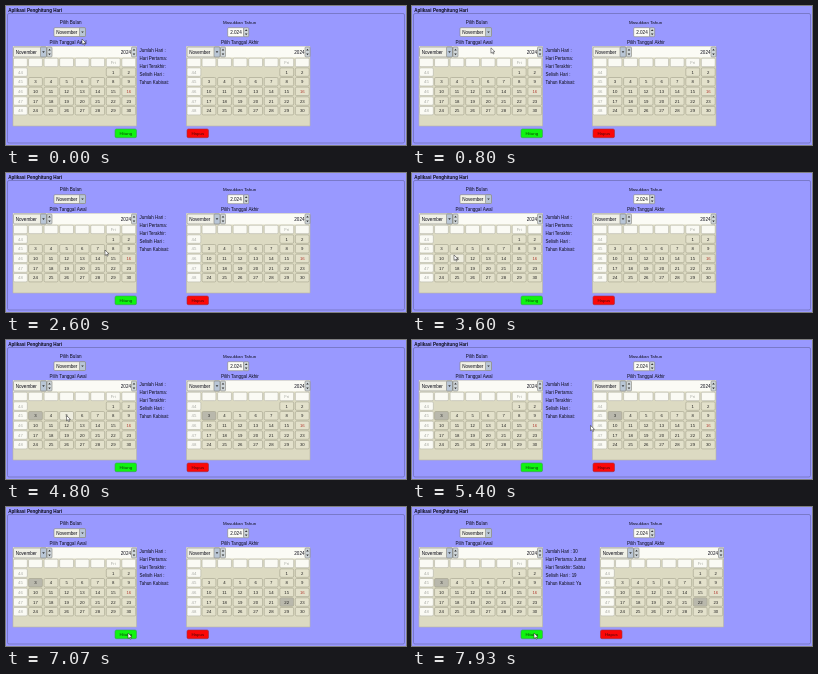
These frames come from a looping animation (400x139 px, 8 s). An HTML page with a canvas:

```html
<!DOCTYPE html>
<html lang="id">
<head>
<meta charset="utf-8">
<title>Aplikasi Penghitung Hari</title>
<style>
html, body { margin: 0; width: 100%; height: 100%; overflow: hidden; background: #9999ff; }
canvas { display: block; width: 400px; height: 139px; }
</style>
</head>
<body>
<canvas id="stage"></canvas>
<script>
const W = 400, H = 139, LOOP = 8000;
const START_CLICK = 4000, END_CLICK = 6100, COUNT_CLICK = 7400, PRESS = 120;
const FONT = '"Liberation Sans", Arial, sans-serif';
const canvas = document.getElementById('stage');
const ctx = canvas.getContext('2d');
const ratio = window.devicePixelRatio || 1;
canvas.width = Math.round(W * ratio);
canvas.height = Math.round(H * ratio);

// Pointer stops: time, x, y
const path = [
  [0, 76, 33], [870, 79, 42], [1600, 79.5, 47.5], [1800, 80, 49],
  [2600, 99, 77], [2800, 99, 78], [3600, 42, 82], [3900, 31, 75],
  [4350, 32, 75], [4800, 60.5, 75.5], [5950, 281.5, 94], [6330, 281.5, 94],
  [6930, 122, 126], [LOOP, 122, 126]
];

function pointerAt(t) {
  let i = 1;
  while (i < path.length - 1 && path[i][0] < t) i++;
  const [t0, x0, y0] = path[i - 1], [t1, x1, y1] = path[i];
  const k = (t - t0) / (t1 - t0), e = k * k * (3 - 2 * k);
  return { x: x0 + (x1 - x0) * e, y: y0 + (y1 - y0) * e };
}

function box(x, y, w, h, fill, stroke, r = 1) {
  ctx.beginPath();
  ctx.roundRect(x, y, w, h, r);
  if (fill) { ctx.fillStyle = fill; ctx.fill(); }
  if (stroke) { ctx.strokeStyle = stroke; ctx.lineWidth = 0.6; ctx.stroke(); }
}

function text(s, x, y, { size = 4.6, color = '#0c0c18', align = 'left', weight = '' } = {}) {
  ctx.font = `${weight} ${size}px ${FONT}`;
  ctx.fillStyle = color;
  ctx.textAlign = align;
  ctx.textBaseline = 'alphabetic';
  ctx.fillText(s, x, y + size * 0.36);
}

function arrow(x, y, dir) {
  ctx.fillStyle = '#333';
  ctx.beginPath();
  ctx.moveTo(x - 1.3, y - dir * 0.7);
  ctx.lineTo(x + 1.3, y - dir * 0.7);
  ctx.lineTo(x, y + dir);
  ctx.fill();
}

function combo(x, y, w, h, label) {
  box(x, y, w, h, '#f0f0e6', '#85857c');
  box(x + w - 6, y, 6, h, '#b9c6d6', '#85857c');
  text(label, x + 2.2, y + h / 2);
  arrow(x + w - 3, y + h / 2, 1);
}

function spinner(x, y, h) {
  box(x, y, 5, h, '#cfd6da', '#85857c');
  arrow(x + 2.5, y + h * 0.28, -1);
  arrow(x + 2.5, y + h * 0.72, 1);
}

function calendar(x, selected, mouse, pressed) {
  box(x, 40.5, 123.5, 79.5, '#dcdac2', '#b9b7a2', 0);
  box(x, 40.5, 123.5, 11, '#fbfbf5', null, 0);
  combo(x + 0.5, 41, 33, 10, 'November');
  spinner(x + 34, 41, 10);
  text('2024', x + 118, 46.3, { align: 'right' });
  spinner(x + 118.5, 41, 10);

  const cw = 15.55, rh = 9.65, top = 52.2;
  for (let row = 0; row < 6; row++) {
    for (let col = 0; col < 8; col++) {
      const cx = x + 0.5 + col * cw - (col ? 0.5 : 0), cy = top + row * rh;
      const w = cw - 1.7, h = rh - 1.2;
      const day = (row - 1) * 7 + col - 5;
      const plain = row === 0 || col === 0;
      if (!plain && (day < 1 || day > 30)) continue;
      const hover = mouse.x >= cx && mouse.x < cx + w && mouse.y >= cy && mouse.y < cy + h;
      let fill = '#e3e1cb', color = day === 16 ? '#b03a30' : '#1c1c1c';
      if (plain) {
        fill = '#fafaf4';
        color = '#a8aaa4';
      } else if (hover && pressed) {
        fill = '#8e929c';
      } else if (day === selected) {
        fill = '#b9b8ac';
      } else if (hover) {
        fill = '#eeeddf';
      }
      box(cx, cy, w, h, fill, plain ? '#b4b4a6' : '#a3a18c', 1.3);
      const label = plain ? (row ? String(43 + row) : col === 6 ? 'Fri' : '') : String(day);
      text(label, cx + w / 2, cy + h / 2, { size: 4.3, color, align: 'center' });
    }
  }
}

function button(x, label, fill, edge, color) {
  box(x, 123, 21.5, 8.7, fill, edge, 1.5);
  text(label, x + 10.75, 127.5, { size: 4.4, align: 'center', color });
}

function pointer({ x, y }) {
  const pts = [[0, 0], [0, 5.4], [1.3, 4.3], [2.2, 6.2], [3.1, 5.8], [2.3, 4], [4, 3.9]];
  ctx.beginPath();
  pts.forEach(([dx, dy]) => ctx.lineTo(x + dx, y + dy));
  ctx.closePath();
  ctx.fillStyle = '#fff';
  ctx.strokeStyle = '#222';
  ctx.lineWidth = 0.5;
  ctx.fill();
  ctx.stroke();
}

function draw(t) {
  const mouse = pointerAt(t);
  const pressed = [START_CLICK, END_CLICK].some(at => t >= at && t < at + PRESS);
  const counted = t >= COUNT_CLICK;
  const shift = counted ? 7.5 : 0;
  ctx.setTransform(canvas.width / W, 0, 0, canvas.height / H, 0, 0);
  ctx.fillStyle = '#9999ff';
  ctx.fillRect(0, 0, W, H);
  box(1.5, 7.5, 397, 129.5, null, '#6464a4', 1.5);
  text('Aplikasi Penghitung Hari', 2.2, 4, { size: 4.55, weight: 'bold' });

  text('Pilih Bulan', 64.7, 16, { align: 'center' });
  combo(48, 21.7, 31.5, 8.8, 'November');
  text('Pilih Tanggal Awal', 62, 36, { align: 'center' });
  text('Masukkan Tahun', 233.5, 16, { size: 4.4, align: 'center' });
  box(221.7, 21.7, 16, 9, '#fbfbf5', '#85857c');
  text('2.024', 224.2, 26.2);
  spinner(237.7, 21.7, 9);
  text('Pilih Tanggal Akhir', 234, 36, { align: 'center' });

  const started = t >= START_CLICK ? 3 : 0;
  const ended = t >= END_CLICK + PRESS ? 22 : started;
  calendar(7, started, mouse, pressed);
  calendar(180.5 + shift, ended, mouse, pressed);

  const results = [
    ['Jumlah Hari :', '30'], ['Hari Pertama:', 'Jumat'], ['Hari Terakhir:', 'Sabtu'],
    ['Selisih Hari :', '19'], ['Tahun Kabisat:', 'Ya']
  ];
  results.forEach(([label, value], i) => {
    text(counted ? `${label} ${value}` : label, 133.5, 44.2 + i * 8, { size: 4.45 });
  });

  button(109, 'Hitung', '#10f410', '#3a9a5a', '#0c3c0c');
  button(181 + shift, 'Hapus', '#fb0808', '#a03040', '#4a0808');
  pointer(mouse);
}

function tick(now) {
  draw(now % LOOP);
  requestAnimationFrame(tick);
}
draw(0);
requestAnimationFrame(tick);
</script>
</body>
</html>
```
